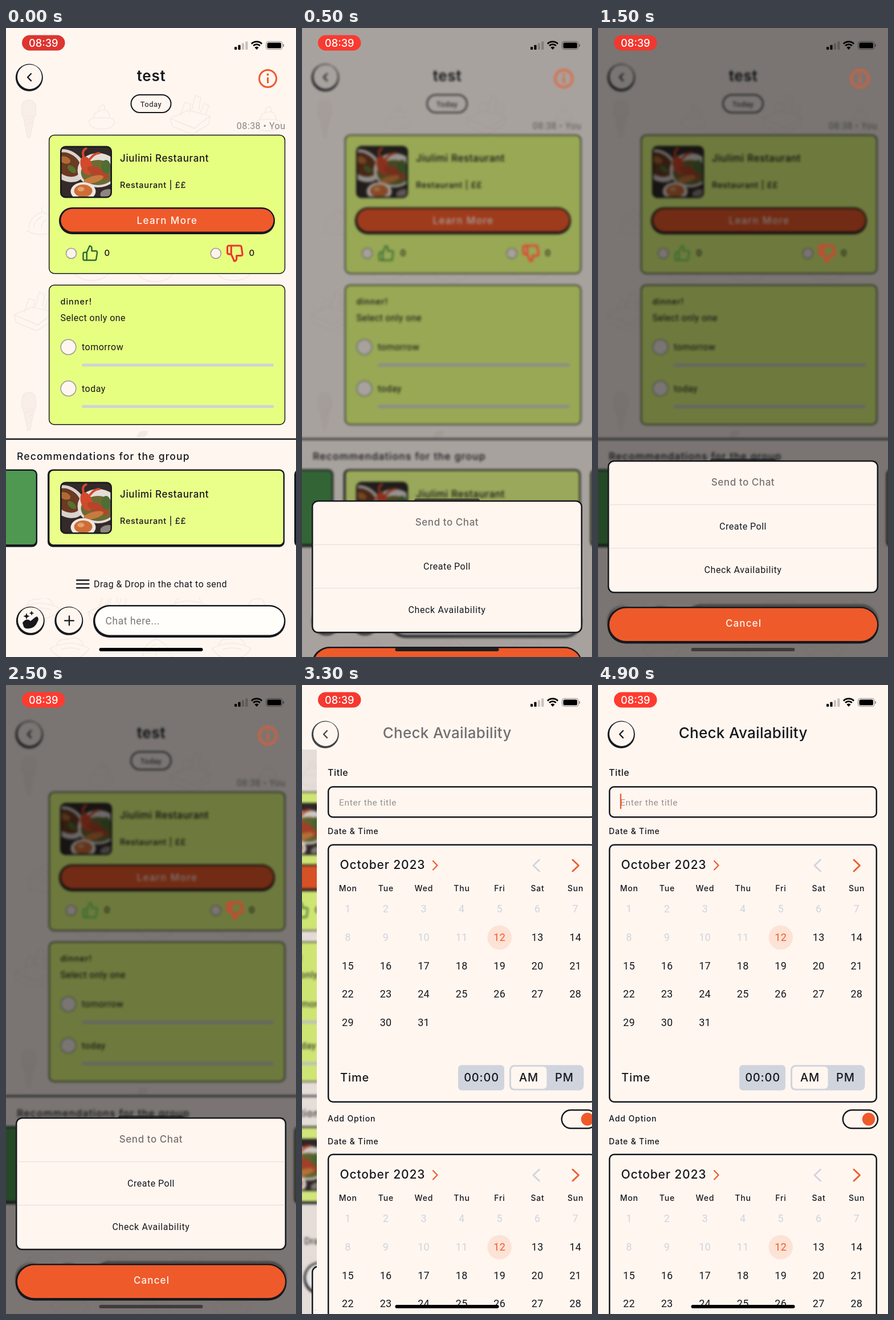
An HTML page for the animation above (5 s loop, 509 by 1101 pixels).

```html
<!DOCTYPE html>
<html lang="en">
<head>
<meta charset="utf-8">
<title>Group chat: check availability</title>
<style>
  html, body { margin: 0; width: 100%; height: 100%; overflow: hidden; background: #fff6f0; }
  svg { display: block; width: 509px; height: 1101px; }
  text { fill: #16181d; white-space: pre; }
  .i { font-family: Inter, sans-serif; font-weight: 500; }
  .bold { font-weight: 600; }
  .r { font-family: Roboto, sans-serif; }
  .mid { text-anchor: middle; }
  .end { text-anchor: end; }
  .line { fill: none; stroke-linecap: round; stroke-linejoin: round; }
  .doodle { fill: none; stroke: #f5eae3; stroke-width: 1.6; stroke-linejoin: round; }

  /* Ten poses a second: moving parts hold each pose; the small lead keeps pose changes off the sampling instant. */
  .chat, .lit { animation: soft 5s step-end -10ms infinite, shift 5s step-end -10ms infinite; }
  .dim { animation: dim 5s step-end -10ms infinite; }
  .sheet { animation: sheet 5s step-end -10ms infinite; }
  .grip { animation: grip 5s step-end -10ms infinite; }
  .ripple { transform-box: fill-box; transform-origin: center; animation: ripple 5s linear infinite; }
  .bar { animation: bar 5s step-end -10ms infinite; }
  .back { animation: back 5s linear infinite; }
  .oldTitle { animation: oldTitle 5s linear infinite; }
  .oldInfo { animation: oldInfo 5s linear infinite; }
  .newTitle { animation: newTitle 5s linear infinite; }
  .page { animation: page 5s step-end -10ms infinite; }
  .caret { animation: caret 5s step-end -10ms infinite; }
  .pill { animation: pulse 5s linear infinite; }
  .home { animation: home 5s linear infinite; }

  @keyframes soft {
    0% { filter: blur(0); }
    4% { filter: blur(1px); }
    6%, 100% { filter: blur(2.2px); }
  }
  @keyframes shift {
    0% { transform: translateX(0); }
    62% { transform: translateX(-95px); }
    64% { transform: translateX(-133px); }
    66% { transform: translateX(-150px); }
    68%, 100% { transform: translateX(-157px); }
  }
  @keyframes page {
    0% { transform: translateX(509px); }
    62% { transform: translateX(202.3px); }
    64% { transform: translateX(80px); }
    66% { transform: translateX(26px); }
    68% { transform: translateX(6px); }
    70%, 100% { transform: translateX(0); }
  }
  @keyframes dim {
    0% { opacity: 0; }
    6% { opacity: .05; }
    8% { opacity: .14; }
    10% { opacity: .34; }
    12% { opacity: .52; }
    62% { opacity: .5; }
    64% { opacity: .3; }
    66%, 100% { opacity: .1; }
  }
  @keyframes sheet {
    0% { transform: translateY(350px); }
    6% { transform: translateY(310px); }
    8% { transform: translateY(187px); }
    10% { transform: translateY(70px); }
    12% { transform: translateY(0); }
    62% { transform: translateY(25px); }
    64% { transform: translateY(130px); }
    66% { transform: translateY(260px); }
    68%, 100% { transform: translateY(350px); }
  }
  @keyframes grip { 0% { opacity: .65; } 62%, 100% { opacity: 0; } }
  @keyframes ripple {
    0%, 56% { transform: scale(.1); opacity: 0; }
    57% { opacity: 1; }
    62% { transform: scale(1); opacity: 1; }
    66%, 100% { transform: scale(1.6); opacity: 0; }
  }
  @keyframes bar { 0% { opacity: 0; } 62%, 100% { opacity: 1; } }
  @keyframes back { 0%, 62% { opacity: .4; } 68%, 100% { opacity: 1; } }
  @keyframes oldTitle { 0%, 62% { opacity: .4; } 64%, 100% { opacity: 0; } }
  @keyframes oldInfo { 0%, 62% { opacity: .68; } 65%, 100% { opacity: 0; } }
  @keyframes newTitle { 0%, 63% { opacity: 0; } 68%, 100% { opacity: 1; } }
  @keyframes caret { 0% { opacity: 0; } 76% { opacity: 1; } 86% { opacity: 0; } 96%, 100% { opacity: 1; } }
  @keyframes pulse {
    0%, 37%, 74% { fill: #dd3530; }
    12%, 25%, 49%, 62%, 86%, 100% { fill: #ff3b30; }
  }
  @keyframes home { 0%, 8% { fill: #000; } 12%, 60% { fill: #3f3b3b; } 62%, 100% { fill: #000; } }
</style>
</head>
<body>
<svg id="stage" viewBox="0 0 509 1101"></svg>
<script>
const INK = '#16181d', CREAM = '#fff6f0', LIME = '#e6ff80', ORANGE = '#ef5a2b', GREY = '#d0d4dd';

// Shape helpers return SVG markup.
const text = (cls, x, y, size, str, gap = 0, fill = INK) =>
  `<text class="${cls}" x="${x}" y="${y}" font-size="${size}" letter-spacing="${gap}" style="fill:${fill}">${str}</text>`;
const box = (x0, y0, x1, y1, r, fill, stroke = 'none', w = 0) =>
  `<rect x="${x0}" y="${y0}" width="${x1 - x0}" height="${y1 - y0}" rx="${r}" fill="${fill}" stroke="${stroke}" stroke-width="${w}"/>`;
const disc = (x, y, r, fill, stroke = 'none', w = 0) =>
  `<circle cx="${x}" cy="${y}" r="${r}" fill="${fill}" stroke="${stroke}" stroke-width="${w}"/>`;
const line = (d, stroke, w, extra = '') =>
  `<path class="line" d="${d}" stroke="${stroke}" stroke-width="${w}" ${extra}/>`;
const blob = (d, fill) => `<path d="${d}" fill="${fill}"/>`;
const oval = (x, y, rx, ry, fill, turn = 0) =>
  `<ellipse rx="${rx}" ry="${ry}" fill="${fill}" transform="translate(${x} ${y}) rotate(${turn})"/>`;
const group = (cls, ...parts) => `<g class="${cls}">${parts.join('')}</g>`;
const move = (x, y, ...parts) => `<g transform="translate(${x} ${y})">${parts.join('')}</g>`;
// Solid block whose shadow falls to the lower left.
const raised = (x0, y0, x1, y1, r, fill) =>
  box(x0, y0, x1, y1, r, INK) + box(x0 + 3.4, y0 + 2.5, x1 - 2.4, y1 - 4.5, r - 2.5, fill);
const knob = (x, y, r) => disc(x - .2, y + .8, r, INK) + disc(x + .4, y - .6, r - 2.5, CREAM);

const backButton = knob(41, 86, 24) + line('M44 80l-6 6.2 6 6.2', INK, 2.3);
const info = disc(459.5, 88.5, 15, 'none', ORANGE, 3) + disc(459.5, 81.5, 2, ORANGE) +
  line('M459.5 87.5v8', ORANGE, 3);

const doodles = {
  cone: '<path fill="#f9eee8" d="M-12-8q-3-22 12-22t12 22q2 6-2 6L2 36-2 36-10-2q-4 0-2-6z"/><path d="M-10-2H10M-7 6L8 0M-5 16L7 8M-3 26L4 20"/>',
  cake: '<path d="M-22 6q0 14 22 14t22-14q0-6-22-6t-22 6zM-14 1q0-12 14-14t14 14M-5-13q0-8 6-9t4 9"/>',
  basket: '<path d="M-36 4L-4-10 34 0 6 22zM-36 4l4 14 36 14 28-18 2-14M-18 0l8-24 10 3-2 16M2-10l6-26 10 4-4 22M16-4l8-18 8 4-6 16M-22 10l30 12"/>',
  pie: '<path d="M-26 14q26 16 56-2M-22 12q0-22 24-30 20 8 24 26M-14 8q4-14 16-18M0 10q2-10 8-14M2-18q-4-6 2-8"/>',
  bowl: '<path d="M-34 4q34-18 68 0-10 18-34 18T-34 4zM-24 0q4-14 20-12 20-8 28 10M-16 6q16-6 34 0"/>',
  leaf: '<path fill="#f5eae3" d="M-9 2q2-12 18-10 0 12-18 10z"/>'
};
const paper = [
  ['cone', 40, 156], ['cake', 168, 157], ['basket', 324, 154], ['cake', 460, 160],
  ['pie', 62, 340], ['bowl', 150, 420], ['bowl', 262, 422], ['bowl', 400, 420],
  ['basket', 50, 498], ['cone', 40, 668], ['leaf', 239, 714], ['bowl', 60, 1012],
  ['basket', 180, 1018], ['bowl', 320, 1008], ['cake', 440, 1012], ['bowl', 112, 1082],
  ['pie', 262, 1088], ['bowl', 396, 1082]
].map(([kind, x, y]) => move(x, y, doodles[kind])).join('');

const photo = `<g clip-path="url(#photoClip)">` +
  box(0, 0, 90, 90, 0, '#332a29') +
  oval(12, 34, 34, 26, '#d9d3cd', 35) + oval(12, 32, 26, 19, '#6b3a22', 35) +
  oval(8, 24, 10, 6, '#b06a35', 20) + oval(20, 40, 9, 5, '#55702f', 40) +
  oval(66, 42, 36, 30, '#e4ded8') + oval(66, 46, 30, 22, '#6c6b34') +
  oval(46, 34, 10, 17, '#d14a2c', -20) + oval(66, 46, 20, 8, '#b5452a', 25) +
  oval(58, 58, 18, 6, '#c97a3d', -15) + oval(80, 36, 8, 12, '#4f6d35') +
  line('M42 22q-6-14 3-18M52 22q8-10 16-10', '#d14a2c', 4) +
  oval(40, 79, 22, 16, '#eee8e2') + oval(40, 78, 16, 11, '#cf6d38') + oval(36, 75, 6, 4, '#e2a06a') +
  oval(84, 84, 14, 9, '#8e8580') + '</g>' + box(.8, .8, 89.2, 89.2, 8, 'none', INK, 2.6);

const place = move(95.5, 207, photo) +
  text('i', 200, 234, 17, 'Jiulimi Restaurant', .65) +
  text('i', 200, 280, 14.5, 'Restaurant | ££', .7);

const option = (y, label) => disc(109.5, y, 13.3, CREAM, '#9b9896', 1.5) +
  text('r', 133, y + 5.5, 16, label, .5) + box(133, y + 29, 470, y + 34, 2.5, '#cfd2d8');

const chat = [
  group('doodle', paper),
  backButton, text('i bold mid', 255, 93, 26, 'test', .7),
  box(219.5, 117, 289.5, 148, 15.5, CREAM, INK, 2), text('r mid', 254.5, 137.5, 13, 'Today', .5),
  text('r end', 490.5, 177, 16, '08:38 • You', .5, '#8b8684'),
  box(75.7, 187.5, 489.5, 429.7, 9, LIME, INK, 1.5), place,
  raised(93, 314, 472, 361, 23, ORANGE),
  text('i mid', 283, 343, 17, 'Learn More', 1.4, CREAM),
  disc(114.5, 394.5, 9, '#fdf3ee', '#9b9896', 1.5), text('i', 172.5, 398.5, 15, '0'),
  disc(368.3, 394.5, 9, '#fdf3ee', '#9b9896', 1.5), text('i', 426.5, 398.5, 15, '0'),
  box(75.7, 450, 489.5, 694.2, 9, LIME, INK, 1.5),
  text('i', 95.5, 484, 14.5, 'dinner!', 1), text('r', 95.5, 512.5, 16, 'Select only one', .45),
  option(558.5, 'tomorrow'), option(631, 'today'),
  box(-10, 719, 700, 998, 0, CREAM), box(-10, 718.3, 700, 720.8, 0, INK),
  text('i', 19, 756, 17.5, 'Recommendations for the group', 1.2),
  raised(-60, 772.5, 55, 908.5, 9, '#4e9852'),
  raised(73, 772.5, 489, 908.5, 9, '#eafe8a'), move(0, 588, place),
  raised(506, 772.5, 700, 908.5, 9, '#eafe8a'),
  line('M124 966.5h21.5M124 973.2h21.5M124 980h21.5', INK, 2.3),
  text('r', 154, 979, 16, 'Drag & Drop in the chat to send', .45),
  knob(43, 1037, 25),
  blob('M29 1041q7-9 14-3l9-7q3-2 4 1 2 3-1 8-4 10-14 11-8 1-10-3zM36 1024l1.6 4 4 1.6-4 1.6-1.6 4-1.6-4-4-1.6 4-1.6zM45 1020l1.2 3 3 1.2-3 1.2-1.2 3-1.2-3-3-1.2 3-1.2z', INK),
  knob(110.5, 1037, 25), line('M103 1037.3h16M111 1029.3v16', INK, 2.3),
  raised(153, 1010, 490.5, 1067, 28, '#fffefb'),
  text('r', 174.5, 1043.5, 17.5, 'Chat here...', .6, '#7b7876')
];

const thumb = 'M14 9V5a3 3 0 0 0-3-3l-4 9v11h11.28a2 2 0 0 0 2-1.7l1.38-9a2 2 0 0 0-2-2.3zM7 22H4a2 2 0 0 1-2-2v-7a2 2 0 0 1 2-2h3';
const icons = [
  info,
  line(thumb, '#2f6b30', 2, 'transform="translate(133 379) scale(1.25)"'),
  line(thumb, '#ee352c', 2.3, 'transform="translate(402 394.5) scale(1.35 -1.35) translate(-12 -12)"')
];

const sheet = [
  group('grip', box(197, 753.5, 312, 765, 4, INK)),
  box(18.2, 758, 490.8, 988, 10, CREAM, INK, 2.5),
  `<g clip-path="url(#rowClip)">${group('ripple', disc(238, 950, 160, '#ece4e1'))}</g>`,
  box(19.5, 834, 489.5, 835, 0, '#e4dcd8'), box(19.5, 910, 489.5, 911, 0, '#e4dcd8'),
  text('i mid', 254.5, 801, 17, 'Send to Chat', .55, '#777270'),
  text('r mid', 254.5, 878, 16, 'Create Poll', .5),
  text('r mid', 254.5, 954, 16, 'Check Availability', .65),
  raised(16.5, 1013, 492.5, 1077.5, 32, ORANGE),
  text('i mid', 255.5, 1048, 17, 'Cancel', 1.1, CREAM)
];

const colX = i => 54.5 + i * 66.55;
const day = n => {
  const x = colX((n - 1) % 7), y = 398.3 + Math.floor((n - 1) / 7) * 49.6;
  const fill = n < 12 ? GREY : n === 12 ? ORANGE : INK;
  return (n === 12 ? disc(x, 442, 21.3, '#fde2d6') : '') + text('r mid', x, y, 18, n, .3, fill);
};
const calendar = [
  box(20.2, 279.7, 488.8, 729.7, 8, CREAM, INK, 2.5),
  text('i', 40.5, 322, 21, 'October 2023', .85),
  line('M204 308l7.5 7.7-7.5 7.7', ORANGE, 2.2),
  line('M390.5 306l-10.5 10 10.5 10', GREY, 2.8), line('M449 306l10.5 10-10.5 10', ORANGE, 2.8),
  ...['Mon', 'Tue', 'Wed', 'Thu', 'Fri', 'Sat', 'Sun'].map((d, i) => text('i mid', colX(i) + .3, 360.5, 14, d, .8)),
  ...Array.from({ length: 31 }, (_, i) => day(i + 1)),
  text('i', 41, 693.5, 20, 'Time', .9),
  box(248, 665.3, 329, 709.5, 6, GREY), text('i mid', 289, 693.5, 20, '00:00', .8),
  box(338, 665.3, 468.5, 709.5, 8, GREY), box(341, 668, 403.5, 706.8, 6, CREAM),
  text('i mid', 372, 693.5, 20, 'AM', .9), text('i mid', 434.5, 693.5, 20, 'PM', .9)
].join('');

const page = [
  box(0, 113, 509, 1101, 0, CREAM),
  text('i', 19, 158.5, 16, 'Title', .6),
  box(20.2, 178.3, 488.8, 231.3, 8, CREAM, INK, 2.5),
  text('r', 39, 211, 15.5, 'Enter the title', .65, '#97928f'),
  group('caret', box(38.7, 190, 41, 217, 1, ORANGE)),
  text('i', 19, 261, 14, 'Date & Time', .8), calendar,
  text('i', 19, 764, 14, 'Add Option', .9),
  box(429.8, 744, 491, 776, 16, CREAM, INK, 2.5), disc(475, 760, 11.2, ORANGE),
  text('i', 19, 803.5, 14, 'Date & Time', .8), move(0, 542, calendar)
];

const arc = r => line(`M${440 - r * .7} ${37 - r * .72}a${r} ${r} 0 0 1 ${r * 1.4} 0`, '#000', 2.8, 'style="stroke-linecap:butt"');
const status = [
  '<rect class="pill" x="28" y="12.5" width="75.5" height="27" rx="13.5"/>',
  text('i mid', 65.8, 33, 18.2, '08:39', 0, '#fff'),
  ...[0, 1, 2, 3].map(i => box(401 + i * 6.4, 33 - i * 3.2, 405.2 + i * 6.4, 38, 1, i < 2 ? '#000' : 'rgba(0,0,0,.22)')),
  arc(13), arc(8.4), blob('M440 38l-3.6-4a5.4 5.4 0 0 1 7.2 0z', '#000'),
  box(456.5, 23.5, 485, 37.5, 4.2, 'none', 'rgba(0,0,0,.4)', 1.2),
  box(458.5, 25.5, 483, 35.5, 2.6, '#000'), box(486.3, 28, 488, 33, 1, 'rgba(0,0,0,.45)')
];

document.getElementById('stage').innerHTML = [
  `<clipPath id="photoClip">${box(0, 0, 90, 90, 9, '#000')}</clipPath>`,
  `<clipPath id="rowClip">${box(19.5, 911, 489.5, 986.7, 6, '#000')}</clipPath>`,
  box(0, 0, 509, 1101, 0, CREAM),
  group('chat', ...chat),
  group('dim', box(0, 0, 509, 1101, 0, '#000')),
  group('lit', ...icons),
  group('sheet', ...sheet),
  group('page', ...page),
  group('bar', box(0, 0, 509, 113, 0, CREAM),
    group('back', backButton),
    group('oldTitle', text('i', 229.5, 95, 26, 'te...', .9)),
    group('oldInfo', info),
    group('newTitle', text('i mid', 254.7, 93, 26, 'Check Availability', .3))),
  ...status,
  '<rect class="home" x="163.5" y="1085" width="182" height="6" rx="3"/>'
].join('');
</script>
</body>
</html>
```
